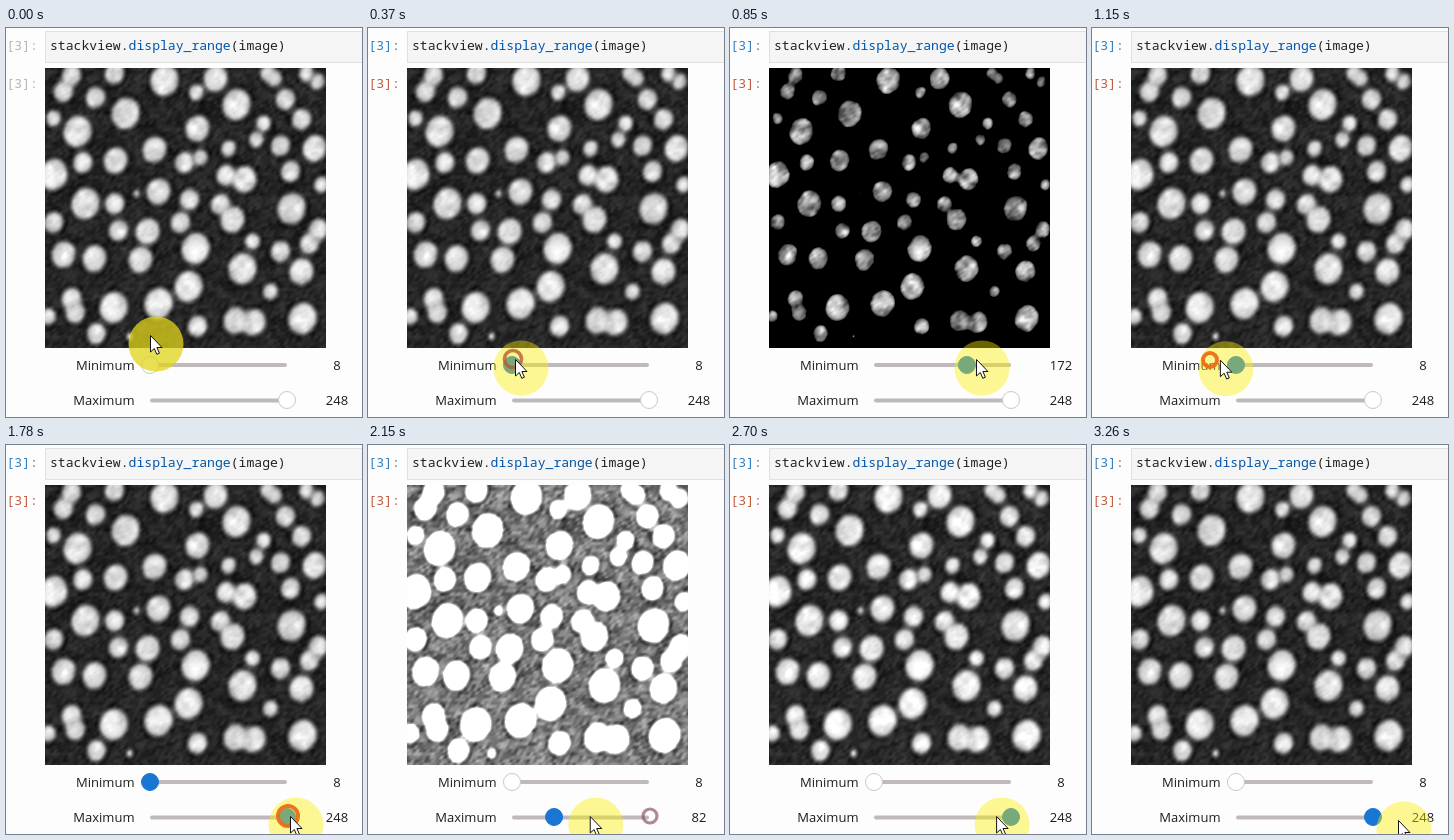
Recreate the animation shown at these times as an HTML page with a canvas. Size 356 by 389 pixels, loop 3.32 s.

```html
<!DOCTYPE html>
<html lang="en">
<head>
<meta charset="utf-8">
<title>Display range</title>
<style>
  html, body { margin: 0; width: 100%; height: 100%; overflow: hidden; background: #fdfdfd; }
  canvas { position: absolute; left: 39px; top: 40px; }
  svg { position: absolute; left: 0; top: 0; }
  .code { font: 13.1px "Noto Sans Mono", "DejaVu Sans Mono", monospace; fill: #212121; white-space: pre; }
  .ui { font: 13px "Open Sans", "Noto Sans", sans-serif; fill: #1c1c1c; }
  .end { text-anchor: end; }
  .mid { text-anchor: middle; }
  .bar { fill: #bfb9bb; }
</style>
</head>
<body>
<canvas id="view" width="281" height="280"></canvas>
<svg width="356" height="389" viewBox="0 0 356 389">
  <rect x="39.5" y="3.5" width="330" height="31" fill="#f5f5f5" stroke="#e0e0e0"/>
  <g class="code">
    <text id="inPrompt" x="0.5" y="22">[3]:</text>
    <text id="outPrompt" x="0.5" y="60">[3]:</text>
    <text x="44" y="22">stackview.<tspan fill="#0055aa">display_range</tspan>(image)</text>
  </g>
  <g class="ui">
    <text class="end" x="128.5" y="342">Minimum</text>
    <text class="end" x="128.5" y="377">Maximum</text>
    <text class="mid" id="lowText" x="331" y="342"></text>
    <text class="mid" id="highText" x="331" y="377"></text>
  </g>
  <rect class="bar" x="144" y="335" width="137" height="4" rx="2"/>
  <rect class="bar" x="144" y="370.5" width="137" height="4" rx="2"/>
  <circle id="lowKnob" cy="337" r="8.5"/>
  <circle id="highKnob" cy="372" r="8.5"/>
  <circle id="glow" r="27.5"/>
  <circle id="ring" fill="none"/>
  <path id="arrow" d="M0 0V16.5L3.8 13L6.3 18.8L8.9 17.7L6.4 12H11.5Z" fill="#fff" stroke="#111" stroke-linejoin="round"/>
</svg>
<script>
const LOOP = 3320, W = 281, H = 280, LAG = 90;
const $ = id => document.getElementById(id);

// Nucleus centres by radius; close neighbours melt into longer shapes
const NUCLEI = {
  2.5: [[130, 165], [123, 308]],
  7: [[190, 64], [47, 90], [222, 120], [194, 129], [246, 213], [264, 263], [315, 156], [42, 288],
    [257, 95], [250, 111], [261, 44], [268, 50], [300, 45], [311, 53]],
  9.5: [[108, 45], [89, 69], [295, 91], [279, 71], [274, 117], [76, 134], [178, 134], [284, 143],
    [220, 147], [108, 175], [214, 176], [112, 202], [47, 194], [183, 171], [174, 194], [274, 223],
    [90, 305], [191, 298], [65, 270], [69, 284], [312, 201], [303, 215], [65, 47], [57, 63]],
  12: [[209, 50], [191, 100], [308, 120], [109, 132], [238, 151], [152, 163], [141, 203], [226, 191],
    [57, 226], [88, 230], [295, 243], [148, 121], [134, 231], [229, 292], [247, 294]],
  14.3: [[158, 52], [230, 76], [71, 103], [79, 175], [285, 180], [236, 240], [182, 258], [296, 290],
    [152, 275], [107, 279], [119, 85], [189, 220], [47, 146]]
};

function random(x, y) {
  let n = Math.imul(x, 374761393) + Math.imul(y, 668265263) | 0;
  n = Math.imul(n ^ n >>> 13, 1274126177);
  return ((n ^ n >>> 16) >>> 0) / 2147483648 - 1;
}

const smooth = f => f * f * (3 - 2 * f);

function noise(x, y, size) {
  const u = x / size, v = y / size, i = Math.floor(u), j = Math.floor(v);
  const a = smooth(u - i), b = smooth(v - j);
  return (random(i, j) * (1 - a) + random(i + 1, j) * a) * (1 - b) +
    (random(i, j + 1) * (1 - a) + random(i + 1, j + 1) * a) * b;
}

// Smooth minimum: bridges the gap between touching nuclei
function join(a, b, k = 6) {
  const h = Math.max(k - Math.abs(a - b), 0) / k;
  return Math.min(a, b) - h * h * k / 4;
}

// Distance to a slightly tall ellipse leaning to the right
function edge(dx, dy, r) {
  const a = (dx * 0.96 + dy * 0.28) / 0.94, b = (dy * 0.96 - dx * 0.28) / 1.06;
  return Math.hypot(a, b) - r;
}

// Raw intensities, before the display range is applied
function makeField() {
  const dist = new Float32Array(W * H).fill(30);
  for (const [size, centres] of Object.entries(NUCLEI))
    for (const [x, y] of centres) {
      const r = +size, cx = x - 39, cy = y - 40, reach = r + 12;
      for (let j = Math.max(0, Math.ceil(cy - reach)); j < Math.min(H, cy + reach); j++)
        for (let i = Math.max(0, Math.ceil(cx - reach)); i < Math.min(W, cx + reach); i++)
          dist[j * W + i] = join(dist[j * W + i], edge(i - cx, j - cy, r));
    }
  return dist.map((d, k) => {
    const x = k % W, y = Math.floor(k / W);
    const fine = noise(x + y * 0.5, y, 3.4), wide = noise(x + 500, y + 300, 8);
    const back = 44 + 12 * fine + 9 * wide - 12 * Math.exp(-(((d - 4) / 2) ** 2));
    const body = 214 + 10 * fine + 22 * wide + Math.min(10, -d);
    return back + (body - back) / (1 + Math.exp(d / 1.2));
  });
}

const field = makeField(), ctx = $("view").getContext("2d"), pixels = ctx.createImageData(W, H);
let shown = "";

function paint(low, high) {
  const key = low + "/" + high;
  if (key === shown) return;
  shown = key;
  const gain = 255 / (high - low), out = pixels.data;
  for (let k = 0, p = 0; k < W * H; k++, p += 4) {
    out[p] = out[p + 1] = out[p + 2] = (field[k] - low) * gain;
    out[p + 3] = 255;
  }
  ctx.putImageData(pixels, 0, 0);
}

const progress = (t, start, end) => Math.min(1, Math.max(0, (t - start) / (end - start)));

// Out and back again, 0 to 1 to 0
const swing = (t, start, end, power) => Math.max(0, Math.sin(Math.PI * progress(t, start, end))) ** power;
const lowDrag = t => 99 * swing(t, 470, 1060, 0.6);
const highDrag = t => -115.4 * swing(t, 1880, 2680, 1.43);

const toValue = x => Math.round(8 + (x - 144) * 240 / 136);
const lowAt = t => toValue(144 + lowDrag(t));
const highAt = t => Math.min(248, toValue(281 + highDrag(t)));

// Free moves of the hand: start, end, dx, dy
const GLIDES = [[30, 230, 3, 24], [970, 1110, -27, 1], [1240, 1690, 164, 39], [2640, 3010, 22, 4]];

function hand(t) {
  let x = 144 + lowDrag(t) + highDrag(t), y = 307;
  for (const [start, end, dx, dy] of GLIDES) {
    const f = smooth(progress(t, start, end));
    x += dx * f;
    y += dy * f;
  }
  return [x, y];
}

// Press and release in turn: time, how long the ring stays
const CLICKS = [[250, 480], [1150, 250], [1780, 550], [2900, 360]];

function set(id, attrs) {
  for (const name in attrs) $(id).setAttribute(name, attrs[name]);
}

function knob(id, x, active) {
  set(id, { cx: x, fill: active ? "#1976d2" : "#fff", stroke: active ? "#1976d2" : "#c9c9c9" });
}

function drawRing(t) {
  const n = CLICKS.findIndex(([start, stay]) => t >= start && t < start + stay);
  $("ring").style.display = n < 0 ? "none" : "";
  if (n < 0) return;
  const start = CLICKS[n][0], [x, y] = hand(start), f = progress(t, start, start + 250);
  const mix = (a, b) => a + (b - a) * f;
  set("ring", {
    cx: x - 2, cy: y, r: n % 2 ? mix(7, 9) : mix(10, 7), "stroke-width": mix(4, 3.2),
    stroke: `rgba(${mix(236, 125)},${mix(108, 70)},${mix(24, 80)},${mix(0.95, 0.62)})`
  });
}

function render(t) {
  const low = lowAt(t), high = highAt(t), [x, y] = hand(t - LAG), idle = t < 130;
  // The picture brightens at once but darkens a step late
  paint(low, Math.min(high, highAt(t - 60)));
  $("lowText").textContent = low;
  $("highText").textContent = high;
  set("inPrompt", { fill: idle ? "#b5b5b5" : "#307fc1" });
  set("outPrompt", { fill: idle ? "#b5b5b5" : "#bf5b3d" });
  knob("lowKnob", 144 + lowDrag(t), t >= 250 && t < 1840);
  knob("highKnob", 281 + highDrag(t), t >= 1780);
  set("glow", { cx: x + 6, cy: y + 9, fill: idle ? "rgba(225,212,25,.75)" : "rgba(250,238,0,.42)" });
  set("arrow", { transform: `translate(${x + 0.5} ${y + 0.5})` });
  drawRing(t);
}

const BEATS = [0, 130, 1270, 1780, 2150, 2460, 3260];

function frame() {
  const now = performance.now() % LOOP, beat = BEATS.findLast(b => b <= now);
  render(beat + Math.floor((now - beat) / 60) * 60);
  requestAnimationFrame(frame);
}
frame();
</script>
</body>
</html>
```
